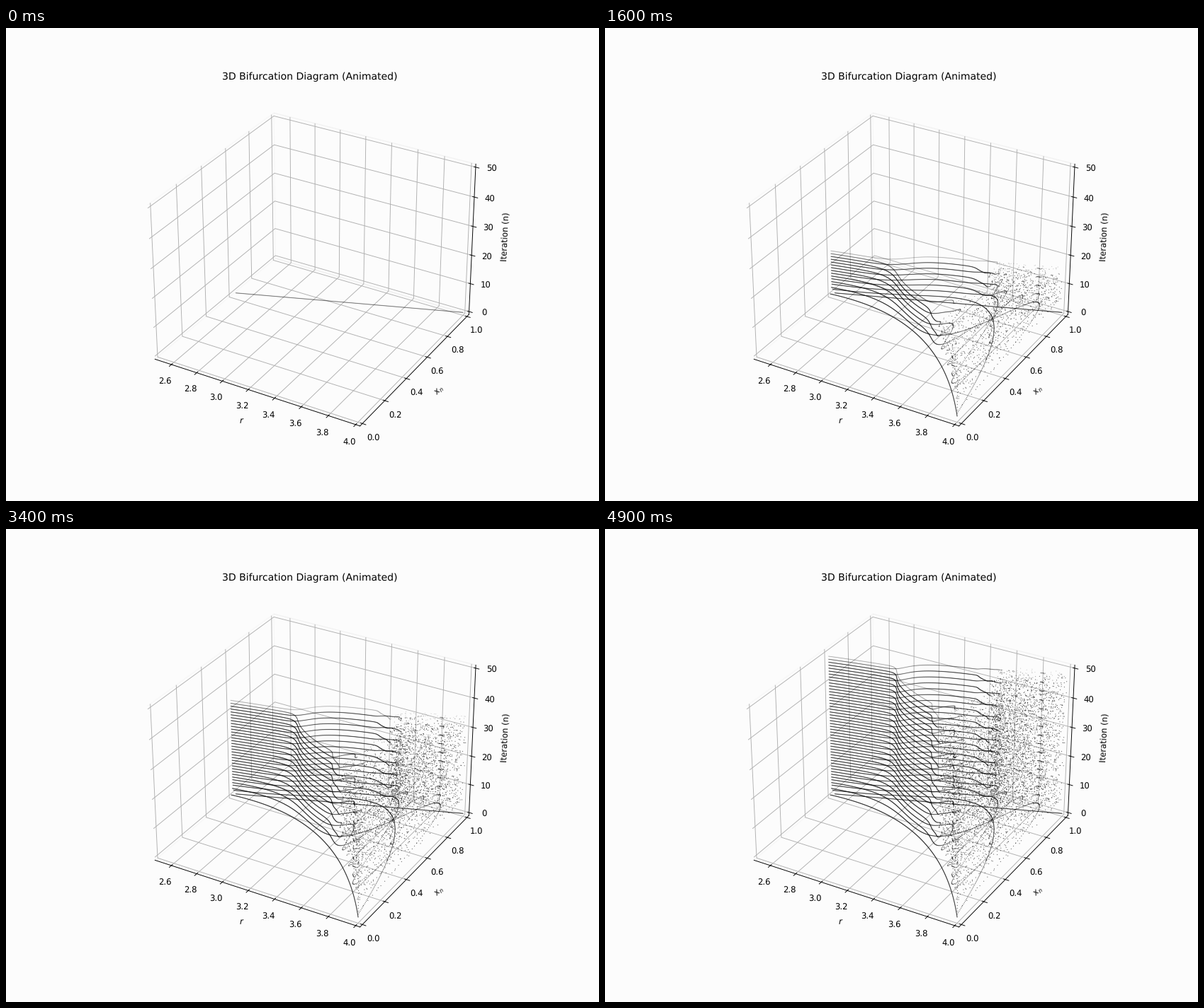
These frames come from a looping animation (837x669 px, 5 s). A matplotlib script:

```python
import numpy as np
import matplotlib.pyplot as plt
from matplotlib.animation import FuncAnimation

DPI = 83.7
WIDTH, HEIGHT = 837, 669
ITERATIONS = 50
BACKGROUND = "#fcfcfc"
FADE_STEP, FULL_ALPHA = 0.2, 0.65
VIEW_MARGIN = 1 / 48

plt.rcParams["text.hinting"] = "none"

# the tiny epsilon keeps the canvas from rounding down by one pixel
fig = plt.figure(figsize=((WIDTH + 1e-6) / DPI, (HEIGHT + 1e-6) / DPI),
                 dpi=DPI, facecolor=BACKGROUND)
ax = fig.add_subplot(projection="3d", facecolor=BACKGROUND)
ax.set_title("3D Bifurcation Diagram (Animated)")
ax.set_xlabel("$r$")
ax.set_ylabel("$x_n$")
ax.set_zlabel("Iteration (n)")
for axis in (ax.xaxis, ax.yaxis, ax.zaxis):
    axis.pane.fill = False


def logistic_layers():
    """One layer of dots for each iteration of x -> r x (1 - x)."""
    r = np.linspace(2.5, 4.0, 500)
    x = np.full_like(r, 0.5)
    layers = []
    for n in range(ITERATIONS):
        x = r * x * (1 - x)
        dots = ax.scatter(r, x, np.full_like(r, n), s=0.75, c="k", marker="D",
                          linewidths=0, edgecolors="none", depthshade=False)
        # two entries make the renderer keep subpixel dot positions
        dots.set_antialiased([True, True])
        layers.append(dots)
    return layers


layers = logistic_layers()
ax.set_xticks(np.linspace(2.6, 4.0, 8))
ax.set_yticks(np.linspace(0, 1, 6))
ax.set_zticks(range(0, 51, 10))
ax.set_xlim(2.5, 4.0, view_margin=VIEW_MARGIN)
ax.set_ylim(0, 1, view_margin=VIEW_MARGIN)
ax.set_zlim(0, 50, view_margin=VIEW_MARGIN)


def update(frame):
    for n, dots in enumerate(layers):
        strength = frame - n + (2 if n == 0 else 1)
        dots.set_visible(n <= frame)
        dots.set_alpha(min(FULL_ALPHA, FADE_STEP * max(strength, 0)))
    return layers


anim = FuncAnimation(fig, update, frames=ITERATIONS, interval=100,
                     init_func=lambda: update(0), repeat=True, repeat_delay=0)
plt.show()
```
